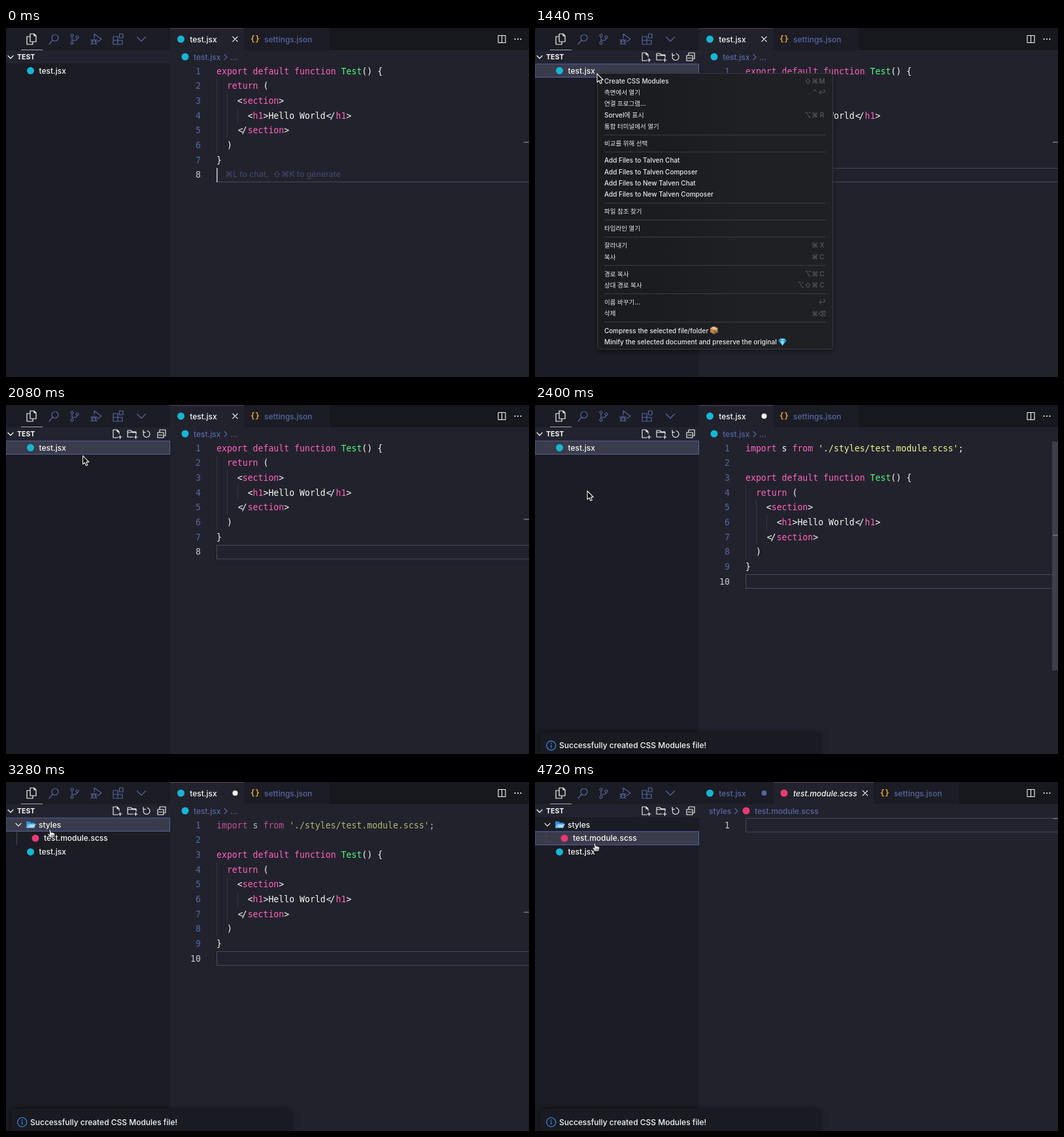
An HTML page with a canvas for the animation above (4.8 s loop, 800x534 px).

```html
<!DOCTYPE html>
<html lang="en">
<head>
<meta charset="utf-8">
<title>Editor demo</title>
<style>
html, body { margin: 0; width: 100%; height: 100%; overflow: hidden; background: #1b1c24; }
canvas { display: block; width: 800px; height: 534px; }
</style>
</head>
<body>
<canvas id="stage" width="800" height="534"></canvas>
<script>
const ctx = document.getElementById('stage').getContext('2d');
const LOOP = 4800;
const UI = 'Inter, "Noto Sans CJK KR", "Noto Sans CJK", "DejaVu Sans", sans-serif';
const MONO = '"DejaVu Sans Mono", "Noto Sans Mono", monospace';
const CODE_SIZE = 13.19, CHAR = 7.94, LINE = 22.67, CODE_X = 322, CODE_Y = 65.8;
const ROW = 20.8, SIDE = 251;

const C = {
  side: '#1b1c24', header: '#22232e', editor: '#22222d', bar: '#17181e',
  select: '#3a3b4b', hover: '#292a36', focus: '#5464a0',
  blue: '#5767a2', white: '#f8f8f4', pink: '#ff64bc', green: '#50fa7b',
  yellow: '#eef58c', line: '#484958', guide: '#363743',
  react: '#16b6d2', sass: '#ea3a72', json: '#dda03a'
};
const TIME = {
  pointer: 400, caretOff: 480, tools: 560, click: 1040, menu: 1400, menuEnd: 2060,
  edit: 2220, toast: 2140, folder: 2700, expand: 3180, open: 4380
};

const component = [
  [['export default function ', 'pink'], ['Test', 'green'], ['() {', 'white']],
  [['  return ', 'pink'], ['(', 'white']],
  [['    <', 'white'], ['section', 'pink'], ['>', 'white']],
  [['      <', 'white'], ['h1', 'pink'], ['>Hello World</', 'white'], ['h1', 'pink'], ['>', 'white']],
  [['    </', 'white'], ['section', 'pink'], ['>', 'white']],
  [['  )', 'white']],
  [['}', 'white']],
  []
];
const importLine = [['import ', 'pink'], ['s ', 'white'], ['from ', 'pink'],
  ["'./styles/test.module.scss'", 'yellow'], [';', 'white']];

// Each group is followed by a separator; items are [label, shortcut].
const menuGroups = [
  [['Create CSS Modules', '⇧⌘M'], ['측면에서 열기', '⌃↩'], ['연결 프로그램...'],
    ['Sorvel에 표시', '⌥⌘R'], ['통합 터미널에서 열기']],
  [['비교를 위해 선택']],
  [['Add Files to Talven Chat'], ['Add Files to Talven Composer'],
    ['Add Files to New Talven Chat'], ['Add Files to New Talven Composer']],
  [['파일 참조 찾기']],
  [['타임라인 열기']],
  [['잘라내기', '⌘X'], ['복사', '⌘C']],
  [['경로 복사', '⌥⌘C'], ['상대 경로 복사', '⌥⇧⌘C']],
  [['이름 바꾸기...', '↩'], ['삭제', '⌘⌫']],
  [['Compress the selected file/folder'], ['Minify the selected document and preserve the original']]
];

const pointerKeys = [
  [400, 236, 202], [880, 96, 72], [1360, 95, 70], [1520, 95, 70], [1840, 118, 77],
  [2060, 118, 77], [2380, 80, 131.5], [2640, 80, 131.5], [3120, 67, 73],
  [3480, 67, 73], [3920, 91, 94]
];

const clamp = v => Math.max(0, Math.min(1, v));
const ease = v => { v = clamp(v); return v * v * (3 - 2 * v); };

function rect(x, y, w, h, color) {
  ctx.fillStyle = color;
  ctx.fillRect(x, y, w, h);
}
function dot(x, y, r, color) {
  ctx.fillStyle = color;
  ctx.beginPath();
  ctx.arc(x, y, r, 0, Math.PI * 2);
  ctx.fill();
}
function text(str, x, cy, color, size = 12, style = '500', family = UI, align = 'left') {
  ctx.font = `${style} ${size}px ${family}`;
  ctx.textAlign = align;
  ctx.fillStyle = color;
  ctx.fillText(str, x, cy + size * 0.36);
}
function path(d, x, y, color, width = 1.1, fill) {
  const p = new Path2D(d);
  ctx.save();
  ctx.translate(x, y);
  ctx.lineJoin = ctx.lineCap = 'round';
  if (fill) { ctx.fillStyle = fill; ctx.fill(p); }
  if (color) { ctx.strokeStyle = color; ctx.lineWidth = width; ctx.stroke(p); }
  ctx.restore();
}
function frame(x, y, w, h, color) {
  ctx.strokeStyle = color;
  ctx.lineWidth = 1;
  ctx.strokeRect(x, y, w, h);
}
const chevronDown = (x, y, color, s = 4) => path(`M${-s} ${-s / 2}L0 ${s / 2}L${s} ${-s / 2}`, x, y, color, 1.2);
const chevronRight = (x, y, color = C.blue) => path('M-2 -4L2 0L-2 4', x, y, color);
const cross = (x, y) => path('M-3.7 -3.7L3.7 3.7M3.7 -3.7L-3.7 3.7', x, y, C.white, 1.2);
const react = (x, y) => dot(x, y, 5.5, C.react);
const sass = (x, y) => dot(x, y, 5.5, C.sass);

function activityBar() {
  rect(0, 0, SIDE, 34, C.side);
  path('M-2 -8H4L7 -5V4H-2ZM4 -8V-5H7M-2 -4H-7V8H2V4', 39, 17, C.white, 1.2);
  rect(23, 33, 33, 1, '#a5a5b3');
  path('M-2 2L-7 8M-3 -2A5 5 0 1 0 7 -2A5 5 0 1 0 -3 -2', 73, 17, C.blue, 1.2);
  path('M-4 -3.5V4M-6 -5.5A2 2 0 1 0 -2 -5.5A2 2 0 1 0 -6 -5.5M-6 6A2 2 0 1 0 -2 6A2 2 0 1 0 -6 6M2 -3A2 2 0 1 0 6 -3A2 2 0 1 0 2 -3M4 -1C4 2 1 2 -3.5 2',
    105, 17, C.blue, 1.2);
  path('M-3 -2V-8L8 0L2 4M-6 3A2.5 2.5 0 0 1 -1 3V5A2.5 2.5 0 0 1 -6 5ZM-8 1L-6 3M1 1L-1 3M-8 5H-6M-1 5H1M-8 8L-6 7M1 8L-1 7M-6 3H-1',
    138, 17, C.blue, 1.1);
  path('M-7 -4H0V8H-7ZM-7 2H7V8H0M2.5 -8H8V-2H2.5Z', 171, 17, C.blue, 1.2);
  chevronDown(207, 17, C.blue, 6.5);
}

function explorerTools() {
  path('M2 6H-5V-6H1L4 -3V0M1 -6V-3H4M3 5H8M5.5 2.5V7.5', 169, 44, C.white);
  path('M1 5H-7V-5H-2L0 -3H6V1M-7 -2H6M3 5H8M5.5 2.5V7.5', 193, 44, C.white);
  path('M-4 -3A5 5 0 1 0 1 -5M-5 -6V-2.7H-1.5', 215, 44.5, C.white);
  path('M-6 -2H3V6H-6ZM-3 -2V-6H6V3H3M-4 2H1', 238, 44, C.white);
}

function folderIcon(x, y) {
  path('M-7 -5H-2L0 -3H6V5H-7Z', x, y, null, 0, '#2f8fdb');
  path('M-4 -1H8L5 5H-7Z', x, y, null, 0, '#78c4f3');
  path('M-1 1H5M-2 3H4', x, y, '#e0f3ff', 1);
}

function treeRows(t) {
  const rows = t >= TIME.folder ? ['styles'] : [];
  if (t >= TIME.expand) rows.push('test.module.scss');
  rows.push('test.jsx');
  return rows;
}

function sidebar(t, pointer) {
  rect(0, 34, SIDE, 500, C.side);
  rect(0, 34, SIDE, 20, C.header);
  chevronDown(7, 44.5, C.white);
  text('TEST', 17, 44.5, C.white, 10.5, 'bold');
  if (t >= TIME.tools) explorerTools();

  const selected = t >= TIME.open ? 'test.module.scss' : t >= TIME.expand ? 'styles' : t >= TIME.click ? 'test.jsx' : '';
  treeRows(t).forEach((name, i) => {
    const top = 55 + i * ROW, cy = top + 10.3;
    if (name === selected) {
      rect(0, top, SIDE, ROW, C.select);
      frame(0, top, SIDE - 0.5, ROW - 0.5, C.focus);
    } else if (pointer && pointer.row === i) {
      rect(0, top, SIDE, ROW, C.hover);
    }
    if (name === 'styles') {
      if (t >= TIME.expand) chevronDown(19, cy, C.white);
      else chevronRight(19, cy, C.white);
      folderIcon(38, cy);
      text(name, 50, cy, C.white);
    } else if (name === 'test.jsx') {
      react(37.5, cy);
      text(name, 50.5, cy, C.white);
    } else {
      rect(16, top, 1, ROW, '#454654');
      sass(45, cy);
      text(name, 58, cy, C.white);
    }
  });
}

function jsonTab(x) {
  rect(x, 0, 131, 34, C.side);
  text('{}', x + 17, 17, C.json, 12, 'bold', MONO, 'center');
  text('settings.json', x + 31, 17.3, C.blue);
}

function activeTab(x, w) {
  rect(x, 0, w, 34, C.editor);
  rect(x, 0, w, 1, '#623d5c');
}

function tabs(t) {
  rect(SIDE, 0, 549, 34, C.bar);
  const opened = t >= TIME.open;
  if (opened) {
    rect(SIDE, 0, 114, 34, C.side);
    activeTab(365, 153);
    sass(381, 17);
    text('test.module.scss', 395, 17.3, C.white, 12, 'italic 500');
    cross(505, 17);
    jsonTab(518);
  } else {
    activeTab(SIDE, 113);
    jsonTab(364);
  }
  react(267.5, 17);
  text('test.jsx', 281.3, 17.3, opened ? C.blue : C.white);
  if (t >= TIME.edit) dot(350.5, 17, 4, opened ? C.blue : C.white);
  else cross(350.5, 17);
  path('M-5.5 -5.5H5.5V5.5H-5.5ZM0 -5.5V5.5', 758.5, 17, C.white, 1.1);
  for (let i = -1; i <= 1; i++) dot(783 + i * 4.4, 17, 1.1, C.white);
}

function breadcrumb(t) {
  if (t >= TIME.open) {
    text('styles', 266, 44.2, C.blue);
    chevronRight(308, 44.5);
    sass(323, 44);
    text('test.module.scss', 336, 44.2, C.blue);
  } else {
    react(274, 44);
    text('test.jsx', 287, 44.2, C.blue);
    chevronRight(336, 44.5);
    text('...', 343, 44.2, C.blue);
  }
}

function codeLine(tokens, y) {
  let col = 0;
  for (const [str, color] of tokens) {
    // The closing-tag pair is drawn tighter, as a ligature.
    const cut = str.indexOf('</');
    const draw = (s, at, dx = 0) =>
      text(s, CODE_X + (col + at) * CHAR + dx, y, C[color], CODE_SIZE, '', MONO);
    if (cut < 0) draw(str, 0);
    else {
      draw(str.slice(0, cut), 0);
      draw('<', cut, 1);
      draw('/', cut + 1, -1.2);
    }
    col += str.length;
  }
}

function editor(t) {
  rect(SIDE, 34, 549, 500, C.editor);
  breadcrumb(t);
  const opened = t >= TIME.open, edited = t >= TIME.edit;
  const lines = opened ? [[]] : edited ? [importLine, [], ...component] : component;
  const first = edited ? 2 : 0;
  const last = lines.length - 1;
  const lineTop = i => Math.round(CODE_Y + i * LINE - 10.8);

  if (!opened) {
    for (let d = 0; d < 3; d++) {
      const top = lineTop(first + 1 + d);
      rect(CODE_X + Math.round(d * 2 * CHAR), top, 1, lineTop(first + 6 - d) - top, C.guide);
    }
  }

  const top = lineTop(last);
  if (t >= TIME.click) {
    frame(CODE_X + 0.5, top + 0.5, 490, 21, C.line);
  } else {
    rect(CODE_X, top + 21, 478, 1, C.line);
    if (t < TIME.caretOff) rect(CODE_X, top, 1.5, 22, '#c6c6cc');
    text('⌘L to chat,', 335, 223.5, '#3f4663', 12.3);
    text('⇧⌘K to generate', 408, 223.5, '#3f4663', 12.3);
  }

  lines.forEach((tokens, i) => {
    const y = CODE_Y + i * LINE;
    text(String(i + 1), 298, y, i === last ? '#c8c8ce' : C.blue, CODE_SIZE, '', MONO, 'right');
    ctx.globalAlpha = tokens === importLine && t >= 2600 ? 0.7 : 1;
    codeLine(tokens, y);
    ctx.globalAlpha = 1;
  });

  if (edited && !opened) {
    ctx.globalAlpha = 1 - ease((t - 2560) / 400);
    rect(791, 56, 9, 350, '#3d3e4a');
    ctx.globalAlpha = 1;
  }
  rect(792, opened ? 55 : edited ? 198.5 : 174, 8, 1.5, '#777783');
}

function boxEmoji(x, y) {
  path('M-6 -3L0 -6L6 -3V3L0 6L-6 3Z', x, y, null, 0, '#b9824c');
  path('M0 0L6 -3V3L0 6Z', x, y, null, 0, '#8f5e34');
  path('M-6 -3L0 -6L6 -3L0 0Z', x, y, null, 0, '#d9a76c');
  path('M-3 -4.5L3 -1.5V1', x, y, '#ead0a2', 1.4);
}
function gemEmoji(x, y) {
  path('M-6 -1.5L-3.5 -5H3.5L6 -1.5L0 6Z', x, y, null, 0, '#35b4ea');
  path('M-2.5 -1.5L0 -5L2.5 -1.5L0 6Z', x, y, null, 0, '#a4e4fb');
  path('M-6 -1.5H6', x, y, '#1b7db5', 0.8);
}

function menu() {
  // The panel is faintly translucent: lighter over the editor than over the sidebar.
  const glass = ctx.createLinearGradient(190, 0, 310, 0);
  glass.addColorStop(0, '#1b1c20');
  glass.addColorStop(1, '#1f2024');
  ctx.save();
  ctx.shadowColor = 'rgba(0,0,0,.45)';
  ctx.shadowBlur = 9;
  ctx.shadowOffsetY = 3;
  ctx.beginPath();
  ctx.roundRect(95.5, 69.5, 360, 422, 4);
  ctx.fillStyle = glass;
  ctx.fill();
  ctx.restore();
  ctx.strokeStyle = '#3a3b42';
  ctx.lineWidth = 1;
  ctx.stroke();

  let y = 81.3;
  menuGroups.forEach((group, g) => {
    for (const [label, keys = ''] of group) {
      const korean = label.charCodeAt(0) > 0x1100;
      text(label, 106, y, '#e8e8ea', korean ? 9.5 : 10);
      [...keys].reverse().forEach((key, i) =>
        text(key, 439 - i * 10.7, y, '#5a5b61', 10, '500', UI, 'center'));
      y += 17.35;
    }
    if (g < menuGroups.length - 1) {
      rect(106, y - 4.8, 339, 1, '#3d3e44');
      y += 8.67;
    }
  });
  boxEmoji(274, 462.5);
  gemEmoji(378.5, 480);
}

function toast(t) {
  const p = clamp((t - TIME.toast) / 300);
  if (!p) return;
  const dy = 34 * Math.pow(1 - p, 2);
  ctx.save();
  ctx.shadowColor = 'rgba(0,0,0,.5)';
  ctx.shadowBlur = 8;
  rect(8, 500 + dy, 428, 50, '#1a1b22');
  ctx.restore();
  const y = 520.5 + dy;
  path('M-7 0A7 7 0 1 0 7 0A7 7 0 1 0 -7 0M0 -0.8V3.5', 24.7, y, '#3b8eea', 1.2);
  dot(24.7, y - 3.2, 0.9, '#3b8eea');
  text('Successfully created CSS Modules file!', 37, y, C.white);
}

function pointerAt(t) {
  if (t < TIME.pointer) return null;
  let i = pointerKeys.findIndex(k => k[0] > t);
  if (i < 0) i = pointerKeys.length - 1;
  const [t0, x0, y0] = pointerKeys[i - 1], [t1, x1, y1] = pointerKeys[i];
  const k = ease((t - t0) / (t1 - t0));
  const x = x0 + (x1 - x0) * k, y = y0 + (y1 - y0) * k;
  const index = Math.floor((y - 55) / ROW);
  const inMenu = t >= TIME.menu && t < TIME.menuEnd;
  const onRow = !inMenu && index >= 0 && index < treeRows(t).length;
  return { x, y, row: onRow ? index : -1 };
}

function drawPointer({ x, y, row }) {
  if (row < 0) {
    path('M0 0V13L3 10.3L5 15L7.3 14L5.3 9.5H9.3Z', x, y, '#f2f2f2', 1.1, '#08080a');
  } else {
    path('M-1 1C-1 -0.8 1.3 -0.8 1.5 1L2.3 4.5C3 3.4 4.3 3.8 4.5 4.8C5.3 4 6.3 4.6 6.5 5.5C7.4 5 8 6 7.8 7C7.7 9 7 10 6.5 12H0.5C0 10 -2 9 -3.3 7C-3.5 5.8 -2 5.5 -0.2 7Z',
      x, y, '#0b0b0e', 0.9, '#f5f5f5');
    path('M2.2 8V10.3M4 8V10.3M5.6 8V10.3', x, y, '#222', 0.7);
  }
}

function draw(t) {
  const pointer = pointerAt(t);
  editor(t);
  tabs(t);
  activityBar();
  sidebar(t, pointer);
  toast(t);
  if (t >= TIME.menu && t < TIME.menuEnd) menu();
  if (pointer) drawPointer(pointer);
}

function tick() {
  draw(performance.now() % LOOP);
  requestAnimationFrame(tick);
}
tick();
</script>
</body>
</html>
```
